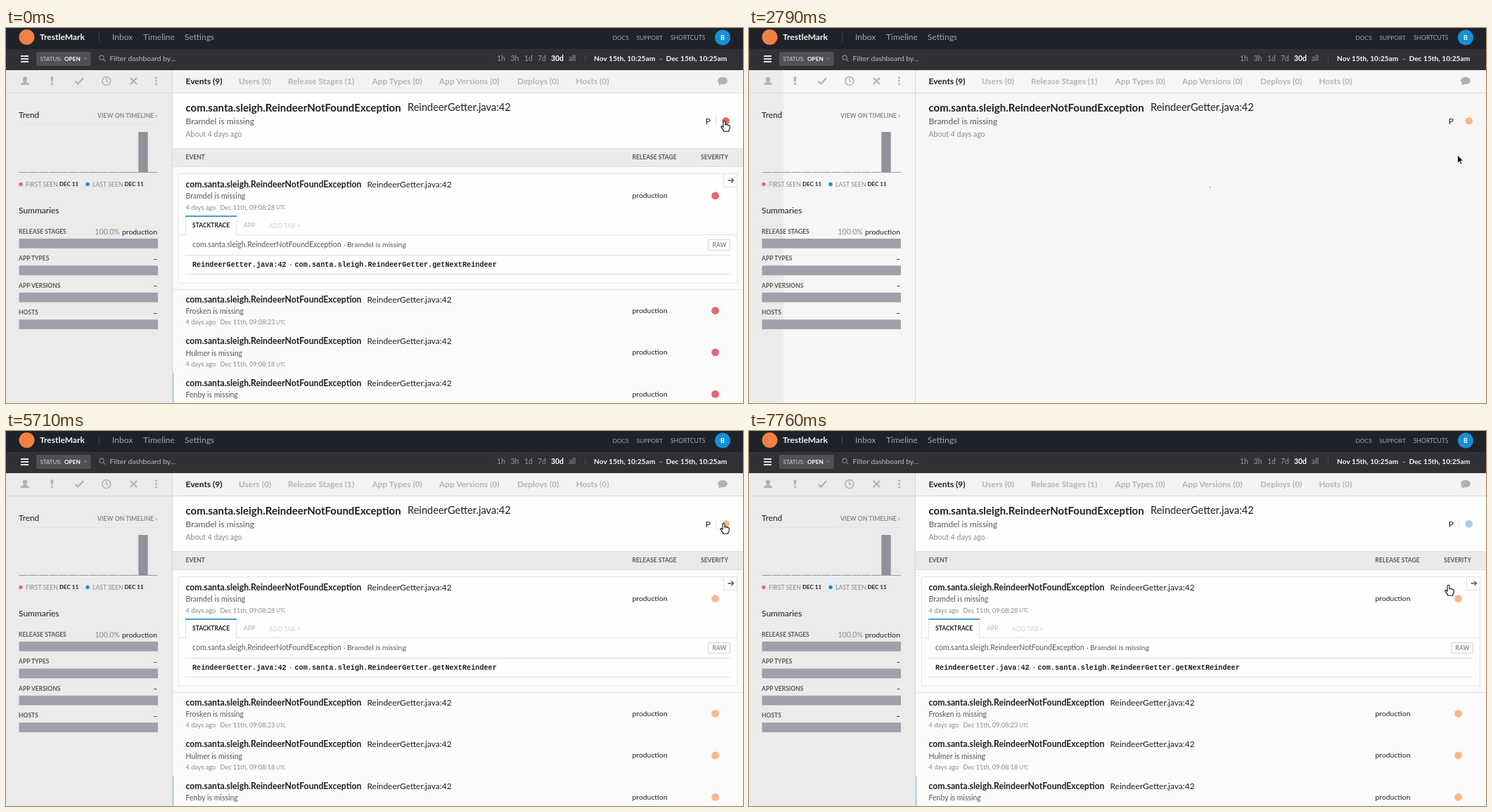
An HTML page that plays this animation: 1048 by 534 pixels, repeating every 8000 ms.

```html
<!DOCTYPE html>
<html lang="en">
<head>
<meta charset="utf-8">
<title>Error dashboard</title>
<style>
html, body { margin: 0; width: 100%; height: 100%; overflow: hidden; background: #fbfbfb; }
svg { display: block; width: 1048px; height: 534px; }
text { font-family: Lato, "Open Sans", sans-serif; white-space: pre; }
.mono { font-family: "Liberation Mono", monospace; }
</style>
</head>
<body>
<svg id="stage" viewBox="0 0 1048 534"></svg>
<script>
const NS = 'http://www.w3.org/2000/svg';
const stage = document.getElementById('stage');
const INK = '#1f1f26', SOFT = '#58585f', GRAY = '#8a8a91', PALE = '#b4b4b6', LINE = '#dedee0';
const RED = '#e26874', ORANGE = '#fdb68c', BLUE = '#a3cae8', STRONG_BLUE = '#1490d6';
const CLASS = 'com.santa.sleigh.ReindeerNotFoundException';
const PLACE = 'ReindeerGetter.java:42';

let layer = stage;

function add(tag, attrs) {
  const node = document.createElementNS(NS, tag);
  for (const key in attrs) node.setAttribute(key, attrs[key]);
  layer.appendChild(node);
  return node;
}

function group(draw, parent = stage) {
  const outer = layer;
  layer = parent;
  const g = add('g', {});
  layer = g;
  draw();
  layer = outer;
  return g;
}

const rect = (x, y, width, height, fill, more) => add('rect', { x, y, width, height, fill, ...more });
const dot = (cx, cy, r, fill) => add('circle', { cx, cy, r, fill });
const path = (d, stroke, width = 1, fill = 'none') =>
  add('path', { d, stroke, 'stroke-width': width, fill });

// y is the visual middle of the line
function text(x, y, str, size, fill = INK, weight = 400, more = {}) {
  const node = add('text', { x, y: y + size * .35, 'font-size': size, 'font-weight': weight, fill, ...more });
  node.textContent = str;
  return node;
}
const bold = (x, y, str, size, fill) => text(x, y, str, size, fill, 700);
const label = (x, y, str, fill = SOFT) => bold(x, y, str, 8.5, fill);

function topBars() {
  rect(0, 0, 1048, 29, '#20222a');
  rect(0, 29, 1048, 31, '#313037');
  rect(0, 28.5, 1048, 1, '#1b1c23');
  dot(29.5, 13, 11, '#f47f45');
  bold(48, 13, 'TrestleMark', 12, '#f4f4f4');
  rect(132, 7, 1, 13, '#43444c');
  text(151, 13, 'Inbox', 12, '#a3a3a9');
  text(195, 13, 'Timeline', 12, '#a3a3a9');
  text(254, 13, 'Settings', 12, '#a3a3a9');
  text(862.5, 14, 'DOCS', 8.4, '#a9a9ae');
  text(896.5, 14, 'SUPPORT', 8.4, '#a9a9ae');
  text(945, 14, 'SHORTCUTS', 8.5, '#a9a9ae');
  dot(1019, 13.5, 11, STRONG_BLUE);
  text(1019, 13.7, 'B', 9, '#fff', 700, { 'text-anchor': 'middle' });

  path('M21 40H32M21 44H32M21 48H32', '#e9e9e9', 2);
  rect(43, 34, 77.5, 20, '#505057', { rx: 2 });
  text(48.5, 43.8, 'STATUS:', 8, '#d2d2d5');
  bold(83, 43.8, 'OPEN', 8.2, '#fff');
  text(110.5, 43.5, '×', 8, '#9a9a9f');
  path('M139.2 42.2a3.1 3.1 0 1 1-6.2 0a3.1 3.1 0 1 1 6.2 0M138.4 44.6L141.5 47.7', '#8a8a90', 1.1);
  text(147.5, 43.3, 'Filter dashboard by...', 10.3, '#bdbdc1');
  [['1h', 698], ['3h', 717.5], ['1d', 737], ['7d', 756], ['all', 800]]
    .forEach(([s, x]) => text(x, 43.3, s, 10.5, '#96969c'));
  bold(775, 43.3, '30d', 10.4, '#fff');
  rect(823, 38, 1, 10, '#4a4a51');
  bold(836, 43.3, 'Nov 15th, 10:25am', 10.2, '#f7f7f7');
  text(928.5, 43.3, '–', 10.2, '#c9c9cc');
  bold(938.5, 43.3, 'Dec 15th, 10:25am', 10.2, '#f7f7f7');
}

function toolIcons() {
  const c = '#b2b2b4';
  path('M27 69.5a3.2 3.2 0 0 1 3 3.5Q30 75.5 28.7 76.5Q29 77.6 33 79V81H21V79Q25 77.6 25.3 76.5Q24 75.5 24 73A3.2 3.2 0 0 1 27 69.5Z', 'none', 0, c);
  path('M63.5 69.5H67.5L66.6 77H64.4Z', 'none', 0, c);
  dot(65.5, 79.5, 1.6, c);
  path('M98.5 75.8L102.3 79.5L110 71', c, 2.4);
  path('M148.8 75.5a6 6 0 1 1-12 0a6 6 0 1 1 12 0M142.8 71.5V75.5L145.3 77', c, 1.6);
  path('M177 71L186 80M186 71L177 80', c, 2.2);
  [71, 75.5, 80].forEach(y => dot(213.5, y, 1.4, c));
  add('ellipse', { cx: 1019, cy: 75, rx: 7, ry: 5.2, fill: c });
  path('M1014 77L1013.5 82L1019 79Z', 'none', 0, c);
}

function sidebar() {
  text(18, 124, 'Trend', 11.8);
  bold(130, 125, 'VIEW ON TIMELINE ›', 8.7, GRAY);
  for (let i = 0; i < 14; i++) rect(18.5 + i * 14.15, 205, 13.2, 1, '#96969c');
  rect(188.3, 148, 13.4, 58, '#92919b');
  dot(21, 222.5, 2.7, RED);
  text(28, 222.5, 'FIRST SEEN', 8.7, GRAY);
  bold(76, 222.5, 'DEC 11', 8);
  dot(116, 222.5, 2.7, STRONG_BLUE);
  text(123, 222.5, 'LAST SEEN', 8.7, GRAY);
  bold(168.5, 222.5, 'DEC 11', 8);

  text(18, 259.5, 'Summaries', 12);
  ['RELEASE STAGES', 'APP TYPES', 'APP VERSIONS', 'HOSTS'].forEach((name, i) => {
    const y = 290 + i * 38.4;
    label(18, y, name);
    rect(18.5, y + 10, 197.5, 13.7, '#a09fab');
    if (i) bold(209.5, y, '–', 10);
  });
  text(126.5, 290, '100.0%', 10.5, GRAY);
  text(165, 290, 'production', 10.4);
}

function heading() {
  bold(255.5, 75.8, 'Events (9)', 12);
  [['Users (0)', 331], ['Release Stages (1)', 401], ['App Types (0)', 520.5],
   ['App Versions (0)', 616], ['Deploys (0)', 727], ['Hosts (0)', 810.5]]
    .forEach(([s, x]) => bold(x, 75.8, s, 11.9, PALE));
  bold(255.5, 113.3, CLASS, 15);
  text(571, 113.3, PLACE, 14.6);
  text(255.5, 133, 'Bramdel is missing', 12.1, SOFT);
  text(255.5, 151.5, 'About 4 days ago', 10.5, GRAY);
  text(994.8, 132.3, 'P', 12);
}

const listDots = [];

function eventRow(y, name, time) {
  bold(255.5, y, CLASS, 12.25);
  text(513.5, y, PLACE, 11.95);
  text(255.5, y + 16.8, name + ' is missing', 10.5, SOFT);
  text(255.5, y + 32.5, '4 days ago', 9.2, GRAY);
  text(304.5, y + 32.5, 'Dec 11th, 09:08:' + time, 9.1, GRAY);
  text(384.3, y + 33, 'UTC', 6.8, GRAY);
  text(890.5, y + 15.5, 'production', 10.4);
  listDots.push(dot(1008.6, y + 15.7, 5.4, RED));
}

function eventList() {
  rect(237, 171, 811, 27, '#eaeaeb');
  rect(237, 171, 811, 1, LINE);
  rect(237, 197, 811, 1, LINE);
  label(255.5, 184.5, 'EVENT');
  label(890.5, 184.5, 'RELEASE STAGE');
  label(988, 184.5, 'SEVERITY');
  rect(237, 372, 811, 1, '#e2e2e4');
  rect(245.5, 207.5, 794, 155.5, '#fefefe', { stroke: '#e6e6e8', rx: 2 });
  eventRow(223, 'Bramdel', '28');
  rect(1020.5, 207.5, 19, 19, '#fefefe', { stroke: '#e2e2e4' });
  path('M1026.5 217H1034.5M1031.3 213.8L1034.5 217L1031.3 220.2', '#55555b', 1.3);

  rect(246, 294, 793, 1, '#e2e2e4');
  rect(255.5, 267.5, 72, 27.5, '#fefefe', { stroke: '#e2e2e4' });
  rect(256, 294, 71, 2, '#fefefe');
  rect(255, 267, 73, 2, '#4a9bd6');
  label(265, 281.5, 'STACKTRACE', INK);
  label(338, 281.5, 'APP', '#c3c3c6');
  bold(374, 281.5, 'ADD TAB +', 8.7, '#dcdcde');
  text(265, 308.7, CLASS, 10.55, SOFT);
  text(480, 308.7, '·', 10.4, SOFT);
  text(485, 308.7, 'Bramdel is missing', 10.4, SOFT);
  rect(998.5, 301.5, 31, 15, '#fefefe', { stroke: '#d2d2d5', rx: 1 });
  label(1004.5, 309.3, 'RAW', GRAY);
  rect(255, 323, 775, 1, LINE);
  rect(255, 350, 775, 1, LINE);
  const mono = { class: 'mono' };
  text(265, 336.8, PLACE, 10.15, INK, 700, mono);
  text(402, 336.8, '·', 10.2, SOFT, 700, mono);
  text(410.5, 336.8, 'com.santa.sleigh.ReindeerGetter.getNextReindeer', 10.2, INK, 700, mono);

  eventRow(386.7, 'Frosken', '23');
  eventRow(446.2, 'Hulmer', '18');
  eventRow(505.7, 'Fenby', '13');
  rect(237, 491, 2, 43, '#b4d6ee');
}

function popup(title, options) {
  return group(() => {
    rect(866, 143, 164, 91, '#000', { opacity: .08, rx: 2 });
    rect(865.5, 141.5, 164, 90.5, '#fdfdfd', { stroke: '#cfcfd2', rx: 1 });
    bold(873.5, 157, 'SEVERITY: ' + title, 9.8, SOFT);
    rect(866, 172, 163, 1, '#e6e6e8');
    options.forEach(([name, color], i) => {
      dot(883.5, 189.5 + i * 25.5, 5.5, color);
      text(898.5, 189 + i * 25.5, 'Change severity to ' + name, 10.5);
    });
  });
}

rect(0, 60, 1048, 474, '#fbfbfb');
rect(237, 60, 811, 32, '#f3f3f4');
rect(237, 93, 811, 78, '#fefefe');
rect(0, 60, 236, 474, '#ebebeb');
const blank = rect(49, 60, 999, 474, '#f6f6f6');
rect(0, 92, 1048, 1, '#dadadc');
rect(236, 60, 1, 474, '#d6d6d8');
const details = group(() => {
  rect(18, 137, 198, 1, '#e3e3e4');
  rect(1009, 125, 1, 15, '#e2e2e4');
});
topBars();
toolIcons();
sidebar();
heading();
const mainDot = dot(1023.7, 132.3, 5.3, RED);
const list = group(eventList);
const spinner = rect(-1, -10.5, 2, 1.2, '#9a9a9e');
const errorMenu = popup('ERROR', [['warning', ORANGE], ['info', BLUE]]);
const warningMenu = popup('WARNING', [['error', RED], ['info', BLUE]]);

const cursor = group(() => {});
const shapes = {
  hand: group(() => path('M-1.5 1Q0-1 1.5 1V5.3Q2.8 4.3 4 5.6Q5.2 4.9 6 6.2Q7.8 5.8 7.8 8V10Q7.6 12 6.3 13V14.8H-1V13.3L-4.6 8.8Q-5 7-3.4 7L-1.5 8.8Z', '#111', 1.1, '#fff'), cursor),
  arrow: group(() => path('M0 0V11.5L2.7 9L4.5 13.2L6.4 12.4L4.6 8.3H8.3Z', '#fff', .8, '#111'), cursor),
  beam: group(() => path('M-2.5-6Q0-6 0-4.5V4.5Q0 6-2.5 6M2.5-6Q0-6 0-4.5M0 4.5Q0 6 2.5 6M-1.5 1.5H1.5', '#222', 1.1), cursor),
};

const LOOP = 8000, LOAD = 2790, PARTIAL = 3930, READY = 4020;
const easeInOut = p => p < .5 ? 2 * p * p : 1 - 2 * (1 - p) ** 2;
const easeOut = p => 1 - (1 - p) ** 2.6;
const home = [1021.5, 132.5], below = [1007.5, 181], trigger = [1020.5, 131.5], infoRow = [994.5, 219.5];
const moves = [
  { start: 750, end: 1180, steps: 6, from: home, to: below, ease: easeInOut },
  { start: 5010, end: 5710, steps: 9, from: below, to: trigger, ease: easeOut },
  { start: 6700, end: 7220, steps: 7, from: trigger, to: infoRow, ease: easeInOut },
];

function cursorAt(t) {
  let pos = home;
  for (const { start, end, steps, from, to, ease } of moves) {
    if (t < start) break;
    const done = Math.min(steps, 1 + Math.floor((t - start) / (end - start) * (steps - 1) + .01));
    const p = ease(done / steps);
    pos = from.map((v, i) => v + (to[i] - v) * p);
  }
  return pos;
}

function shapeAt(t, y) {
  if (t < 1720 || t >= 5710) return 'hand';
  if (t >= LOAD && t < PARTIAL) return 'arrow';
  if (t < 5010) return 'beam';
  return y < 138 ? 'hand' : 'arrow';
}

const show = (node, on) => node.setAttribute('visibility', on ? 'visible' : 'hidden');

function render(t) {
  const loading = t >= LOAD && t < READY;
  const partial = t >= PARTIAL;
  show(list, !loading);
  show(blank, loading);
  blank.setAttribute('y', partial ? 243 : 60);
  blank.setAttribute('height', partial ? 291 : 474);
  show(details, !loading || partial);
  show(spinner, loading);
  const turn = 107 + 47.2 * Math.floor((t - LOAD) / 87.6);
  spinner.setAttribute('transform', `translate(646 224) rotate(${turn})`);

  mainDot.setAttribute('fill', t < 1720 ? RED : t < 7760 ? ORANGE : BLUE);
  listDots.forEach(d => d.setAttribute('fill', t < READY ? RED : ORANGE));
  show(errorMenu, t >= 180 && t < 1720);
  show(warningMenu, t >= 6160 && t < 7760);

  const [x, y] = cursorAt(t);
  cursor.setAttribute('transform', `translate(${x} ${y})`);
  const shape = shapeAt(t, y);
  for (const name in shapes) show(shapes[name], name === shape);
}

const began = performance.now();
function tick() {
  render((performance.now() - began) % LOOP);
  requestAnimationFrame(tick);
}
tick();
</script>
</body>
</html>
```
